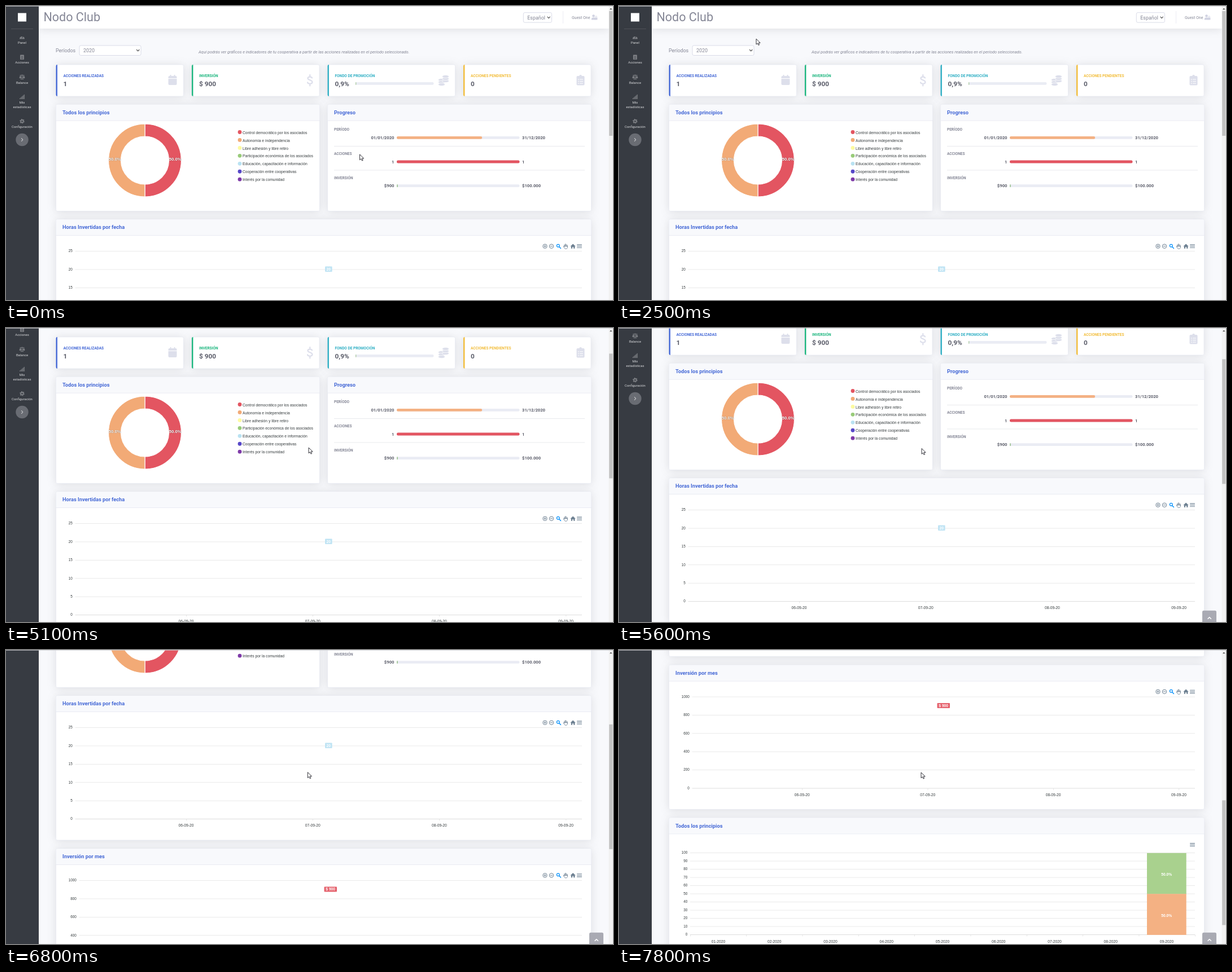
These frames come from a looping animation (1075x521 px, 8000 ms). An HTML page:

```html
<!DOCTYPE html>
<html lang="es">
<head>
<meta charset="utf-8">
<title>Panel</title>
<style>
html, body { margin: 0; width: 100%; height: 100%; overflow: hidden; background: #f8f9fc }
svg { display: block; width: 1075px; height: 521px; font-family: Roboto, "Open Sans", sans-serif }
.chart { font-family: "Liberation Sans", Arial, sans-serif }
.shadow { filter: drop-shadow(0 1.3px 7.8px rgba(58,59,69,.15)) }
.line { fill: none; stroke-linecap: round; stroke-linejoin: round }
.pct { text-shadow: 0 .6px 1px rgba(0,0,0,.6) }
</style>
</head>
<body>
<svg id="stage" viewBox="0 0 1075 521"></svg>
<script>
const GRAY = '#858796', DARK = '#5a5c69', BLUE = '#4468d6', PALE = '#dddfeb', TOOL = '#6e8192';
const RED = '#e35561', ORANGE = '#f2aa76';

const rect = (x, y, w, h, fill, more = '') =>
  `<rect x="${x}" y="${y}" width="${w}" height="${h}" fill="${fill}" ${more}/>`;
const circle = (x, y, r, fill, more = '') => `<circle cx="${x}" cy="${y}" r="${r}" fill="${fill}" ${more}/>`;
const line = (d, stroke, width = 1) => `<path class="line" d="${d}" stroke="${stroke}" stroke-width="${width}"/>`;
const shape = (d, fill, more = '') => `<path d="${d}" fill="${fill}" ${more}/>`;
const at = (x, y, body) => `<g transform="translate(${x} ${y})">${body}</g>`;
// y is the middle of the capitals
const text = (x, y, s, size, fill, more = '') =>
  `<text x="${x}" y="${y + size * .36}" font-size="${size}" fill="${fill}" ${more}>${s}</text>`;
const bold = (x, y, s, size, fill, more = '') => text(x, y, s, size, fill, 'font-weight="700" ' + more);
const MID = 'text-anchor="middle"', END = 'text-anchor="end"';
const label = (x, y, s, more = MID, size = 6.72) => text(x, y, s, size, '#373d3f', 'class="chart" ' + more);
const badge = (x, y, s, size, more = '') => bold(x, y, s, size, '#fff', `class="chart ${more}" ${MID}`);
const range = (n, f) => Array.from({ length: n }, (_, i) => f(i)).join('');

const box = (x, y, w, h) => rect(x, y, w, h, '#fff', 'rx="2.5" class="shadow"') +
  rect(x, y, w, h, 'none', 'rx="2.5" stroke="#e3e6f0" stroke-width=".6"');
const card = (x, y, w, h, title) => box(x, y, w, h) +
  rect(x + .3, y + .3, w - .6, 28.4, '#f8f9fc', 'rx="2"') +
  rect(x, y + 28.3, w, .7, '#e3e6f0') + bold(x + 11.5, y + 14, title, 9.25, BLUE);
const select = (x, y, w, s) => rect(x, y, w, 17.5, '#fff', 'rx="2.5" stroke="#d1d3e2" stroke-width=".8"') +
  text(x + 7, y + 9, s, 8.9, GRAY) + line(`M${x + w - 7.5} ${y + 7.5}l2.2 2.4 2.2-2.4`, '#555', 1.2);
const bar = (x, y, w, part, fill) => rect(x, y - 2.4, w, 4.8, '#eaecf4', 'rx="2.2"') +
  rect(x, y - 2.4, w * part, 4.8, fill, `rx="${part < .1 ? .5 : 2.2}"`);

// Card icons
const icons = {
  calendar: shape('M0 4a2 2 0 0 1 2-2h1V0h2v2h5V0h2v2h1a2 2 0 0 1 2 2v2H0zM0 7h15v9a2 2 0 0 1-2 2H2a2 2 0 0 1-2-2z', PALE),
  dollar: line('M9.5 5.5C9 3.3 2 2.6 2 6.2s8 2.6 8 6.6-8 3.6-8.4.6M5.8 0v3M5.8 16.500v3', PALE, 2.2),
  coins: range(3, i => `<ellipse cx="6" cy="${9 + i * 4}" rx="6" ry="2.6" fill="${PALE}" stroke="#fff" stroke-width=".7"/>`) +
    range(3, i => `<ellipse cx="13" cy="${11 - i * 4}" rx="6" ry="2.6" fill="${PALE}" stroke="#fff" stroke-width=".7"/>`),
  clipboard: rect(0, 2, 14, 16.500, PALE, 'rx="1.7"') + circle(7, 2.5, 2.4, PALE) +
    line('M6 8h5M6 11.500h5M6 15h5', '#fff', 1.1) + line('M3.3 8h.1M3.3 11.500h.1M3.3 15h.1', '#fff', 1.7)
};

const stats = [
  ['ACCIONES REALIZADAS', '1', BLUE, 'calendar', 199],
  ['INVERSIÓN', '$ 900', '#1cb67e', 'dollar', 203.5],
  ['FONDO DE PROMOCIÓN', '0,9%', '#2fafc4', 'coins', 196],
  ['ACCIONES PENDIENTES', '0', '#f2bd3a', 'clipboard', 200.5]
].map(([name, value, color, icon, dx], i) => {
  const x = 88.5 + i * 240.5;
  return box(x, 104, 226, 56) + shape(`M${x + 2.4} 104v56a2.4 2.4 0 0 1-2.4-2.4v-51.200a2.4 2.4 0 0 1 2.4-2.400z`, color) +
    bold(x + 13, 124, name, 6.5, color) + bold(x + 13, 137.500, value, 11.8, DARK) +
    at(x + dx, 122, icons[icon]);
}).join('') + bar(619, 137.300, 138.500, .009, '#a9c9a0');

const legend = [
  ['Control democrático por los asociados', RED], ['Autonomía e independencia', ORANGE],
  ['Libre adhesión y libre retiro', '#fdfba0'], ['Participación económica de los asociados', '#98cb79'],
  ['Educación, capacitación e información', '#b9e2f2'], ['Cooperación entre cooperativas', '#5647c8'],
  ['Interés por la comunidad', '#7e3aa8']
].map(([name, color], i) => circle(414, 223.500 + i * 13.950, 3.4, color) + label(419, 224.200 + i * 13.950, name, '')).join('');

const half = (sweep, fill) =>
  shape(`M246 209a64.500 64.500 0 0 ${sweep} 0 129v-22a42.500 42.500 0 0 ${1 - sweep} 0-85z`, fill, 'stroke="#fff" stroke-width="1.1"');
const donut = half(1, RED) + half(0, ORANGE) +
  badge(192.700, 271, '50.0%', 7.7, 'pct') + badge(299.700, 271, '50.0%', 7.7, 'pct');

const progress = [
  ['PERÍODO', '01/01/2020', '31/12/2020', .695, '#f4b183'],
  ['ACCIONES', '1', '1', 1, RED],
  ['INVERSIÓN', '$900', '$100.000', .009, '#a9c9a0']
].map(([name, from, to, part, color], i) => {
  const y = 219 + i * 42.600;
  return bold(581, y, name, 6.5, GRAY) + bold(687.500, y + 14.500, from, 7.7, DARK, END) +
    bold(914, y + 14.500, to, 7.7, DARK) + bar(692, y + 14.400, 217.500, part, color) +
    (i < 2 ? rect(581, y + 29, 444, .7, '#dfe0e5') : '');
}).join('');

const menu = y => line(`M1011.500 ${y - 2.600}h8M1011.500 ${y}h8M1011.500 ${y + 2.600}h8`, TOOL, 1.1);
const tools = y => at(0, y,
  circle(954.500, 0, 3.700, 'none', `stroke="${TOOL}"`) + line('M952.500 0h4M954.500-2v4', TOOL, .9) +
  circle(966, 0, 3.700, 'none', `stroke="${TOOL}"`) + line('M964 0h4', TOOL, .9) +
  circle(977.800, -1, 2.400, '#fff', 'stroke="#008ffb" stroke-width="1.2"') + line('M979.700 1l2.800 2.800', '#008ffb', 1.4) +
  line('M988.800 1v-3.500M990.500 0v-4M992.200 0v-3.500M994 1v-3', TOOL, 1) +
  shape('M988.300 0h6.200v2.500l-1.500 2h-3l-3-4z', 'none', `stroke="${TOOL}" stroke-width=".8"`) +
  shape('M999.500 0.300l4.600-4.500 4.600 4.500h-1.300v3.700h-2.300v-2.700h-2v2.700h-2.300v-3.700z', TOOL)) + menu(y);

// Horizontal grid with its labels, from the highest value down to 0
const grid = (x, y, count, gap, step) => range(count, i =>
  rect(x, y + i * gap - .3, 1020 - x, .7, i < count - 1 ? '#e0e0e0' : '#cfcfcf') +
  label(x - 4.800, y + i * gap - .4, (count - 1 - i) * step, END, 6.3));
const days = (x, gap, y) => range(4, i => label(x + i * gap, y, `0${6 + i}-09-20`) +
  rect(x + i * gap, y - 11.500, .6, 3, '#d5d5d5'));

const months = range(9, i => label(176 + i * 99.250, 1139, `0${i + 1}-2020`)) +
  range(10, i => rect(126 + i * 99.330, 1127, .6, 3, '#d5d5d5'));

const side = (y, icon, ...names) => at(28.500, y, `<g opacity=".35">${icon}</g>`) +
  names.map((s, i) => text(28.500, y + 9.700 + i * 8.700, s, 5.950, '#d9dadc', MID)).join('');
const sidebar =
  rect(21, 12.500, 15, 15, '#fff') + rect(9, 40, 39, .6, 'rgba(255,255,255,.2)') +
  side(55, shape('M-4.500 3.500a4.500 4.500 0 1 1 9 0z', '#fff') + line('M0 2l1.500-3.500', '#373b42'), 'Panel') +
  side(90.500, rect(-3.500, -4, 7, 8.500, '#fff', 'rx="1"') + line('M-1.500-1h3M-1.500 1h3M-1.500 3h3', '#373b42', .7), 'Acciones') +
  side(125.800, line('M0-4v7.500M-2.500 3.800h5M-3.500-3h7', '#fff') + shape('M-5 1l2-4 2 4a2 1.500 0 0 1-4 0M1 1l2-4 2 4a2 1.500 0 0 1-4 0', '#fff'), 'Balance') +
  side(160.800, range(5, i => rect(-4.500 + i * 1.900, 2.500 - i * 1.600, 1.300, 1.700 + i * 1.600, '#fff')), 'Mis', 'estadísticas') +
  side(204.300, circle(0, 0, 2.300, 'none', 'stroke="#fff" stroke-width="1.8"') +
    circle(0, 0, 3.700, 'none', 'stroke="#fff" stroke-width="1.2" stroke-dasharray="1.700 2.170"'), 'Configuración') +
  circle(28.500, 237, 11.200, '#696c73') + line('M27.500 234.500l2.300 2.500-2.300 2.500', '#d5d6d9', 1.1);

const topbar = rect(58, -20, 1010, 60, '#fff', 'class="shadow"') +
  text(66.500, 19, 'Nodo Club', 21.5, GRAY) + select(916.300, 11.700, 50.200, 'Español') +
  rect(986, 9, .7, 22, '#e3e6f0') + text(1002, 20.300, 'Guest One', 7, GRAY) +
  circle(1040.500, 17.500, 2.300, '#d1d3e2') + shape('M1036.800 24.500v-1a3 3 0 0 1 3-3h2a3 3 0 0 1 2 1v3z', '#d1d3e2') +
  rect(1042.800, 20.500, 4.600, 4, '#d1d3e2', 'rx=".5"') + line('M1043.900 20v-1a1.200 1.200 0 0 1 2.400 0v1', '#d1d3e2', .8);

const page = topbar +
  text(88, 79, 'Períodos', 8.900, GRAY) + select(130, 70, 109, '2020') +
  text(341, 81, 'Aquí podrás ver gráficos e indicadores de tu cooperativa a partir de las acciones realizadas en el período seleccionado.',
    7.3, GRAY, 'font-style="italic"') +
  stats +
  card(88.500, 174.500, 467, 189, 'Todos los principios') + donut + legend +
  card(569.500, 174.500, 467, 189, 'Progreso') + progress +
  card(88.500, 378, 948, 256, 'Horas Invertidas por fecha') + tools(425.700) +
  grid(122.500, 434.500, 6, 32.400, 5) + days(319, 224.200, 608) +
  rect(565, 461.500, 12.600, 9.500, '#c0e4f4', 'rx="1"') + badge(571.300, 466.200, '20', 6.700) +
  card(88.500, 649, 948, 256, 'Inversión por mes') + tools(696.300) +
  grid(129.500, 705.500, 6, 32.400, 200) + days(324.300, 222.400, 879.300) +
  rect(563.500, 716.500, 22.500, 9, '#e5626d', 'rx="1"') + badge(574.700, 721, '$ 900', 6.700) +
  card(88.500, 919.800, 948, 250, 'Todos los principios') + menu(967.700) +
  grid(126, 982, 11, 14.500, 10) + months +
  rect(935, 982.300, 69.700, 72.700, '#a9d18e') + rect(935, 1054.700, 69.700, 72.700, '#f4b183') +
  badge(969.700, 1020.500, '50.0%', 6.700) + badge(969.700, 1093, '50.0%', 6.700);

const stage = document.getElementById('stage');
stage.innerHTML = rect(0, 0, 1075, 521, '#f8f9fc') + `<g id="page">${page}</g>` +
  rect(0, 0, 58, 521, '#373b42') + `<g id="side">${sidebar}</g>` +
  `<g id="up">${rect(1033, 500.700, 25, 25, '#a9aab3', 'rx="2.5"')}${line('M1043 515.300l2.700-2.700 2.700 2.700', '#fff', 1.500)}</g>` +
  rect(1067.500, 0, 7.500, 521, '#f1f1f1') + rect(1068.200, 0, 6, 221, '#c1c1c1', 'id="thumb"') +
  shape('M1069 6.300l2.300-2.600 2.300 2.600z', '#505050') + rect(0, 0, 1075, .8, '#d3d4d8') +
  shape('M0 0v9.800l2.300-2 1.700 3.400 1.600-.8-1.600-3.300h3.200z', '#fff', 'id="cursor" stroke="#1c1c24" stroke-width=".9" stroke-linejoin="round"');

// [ms, page offset] and [ms, x, y]; each value holds until the next
const scrolls = [[0, 0], [4900, 40], [5100, 88], [5200, 102], [5400, 106], [5600, 112], [5800, 122], [6000, 136],
  [6200, 161], [6400, 193], [6600, 235], [6800, 297], [6900, 326], [7100, 371], [7300, 430], [7500, 508], [7600, 548], [7800, 622.5]];
const moves = [[0, 626.500, 263], [1200, 600, 240], [1300, 550, 195], [1400, 480, 130], [1500, 400, 70], [1600, 352, 36],
  [1700, 338.500, 32.500], [1800, 371, 50], [2100, 360, 49.500], [2200, 330, 49.500], [2300, 290, 52], [2400, 258, 56],
  [2500, 243, 58.300], [3600, -30, -30], [4000, 38, 1], [4200, 12.500, 16], [4300, 19.500, 29], [4500, 380, 150],
  [4600, 536, 212], [5600, 536, 213.500], [6200, 534.700, 214.700], [6800, 534.300, 216.700], [7800, 535, 217]];
const valueAt = (keys, t) => keys.findLast(k => k[0] <= t);
const $ = id => document.getElementById(id);
const shift = (id, x, y) => $(id).setAttribute('transform', `translate(${x} ${y})`);

function draw() {
  const t = performance.now() % 8000;
  const y = valueAt(scrolls, t)[1];
  const [, cx, cy] = valueAt(moves, t);
  shift('page', 0, -y);
  shift('side', 0, -y);
  shift('thumb', 0, 9 + y * .4135);
  shift('cursor', cx, cy);
  $('up').setAttribute('opacity', t < 5200 ? 0 : t < 5400 ? .4 : 1);
  requestAnimationFrame(draw);
}
draw();
</script>
</body>
</html>
```
